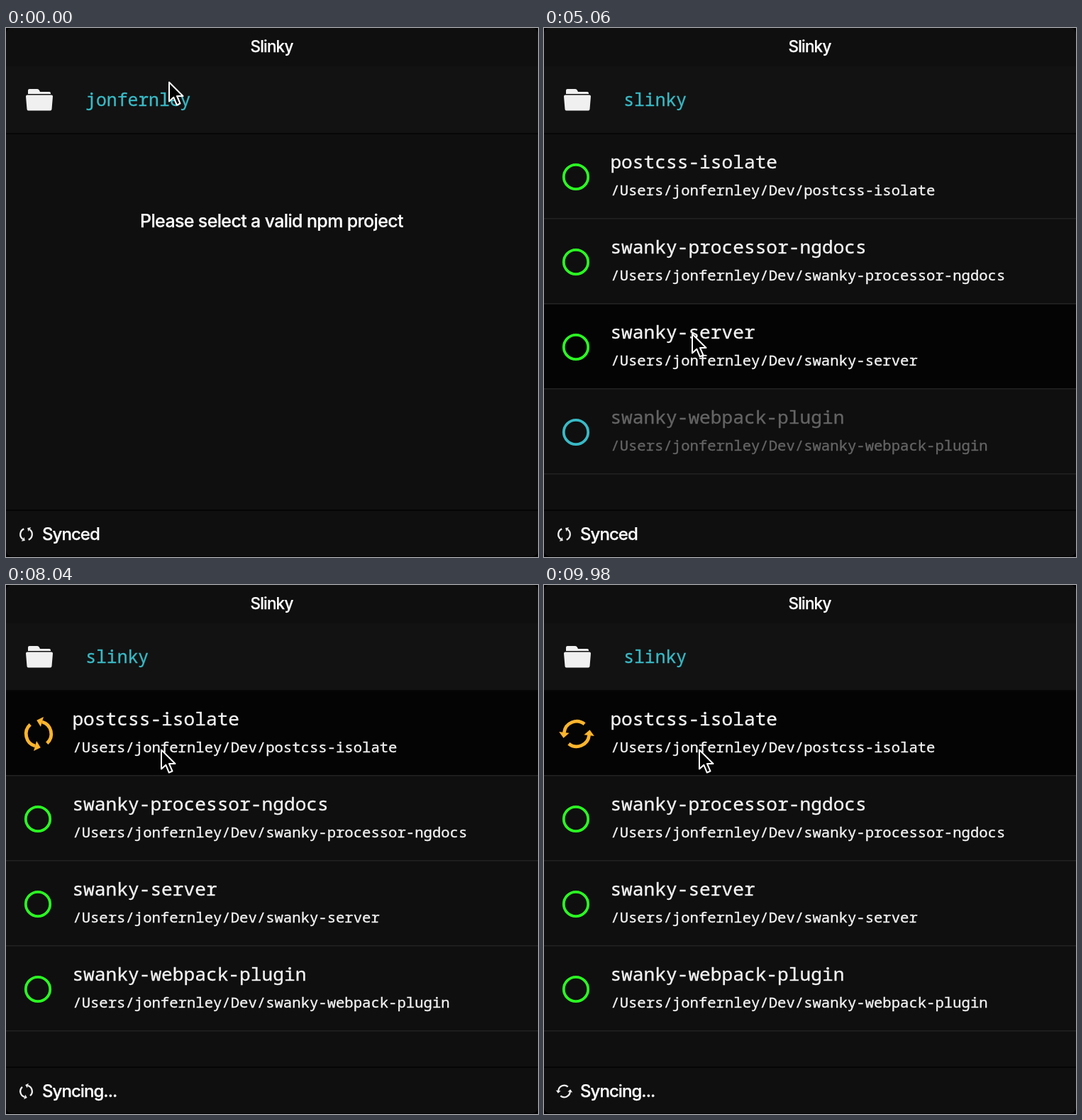
Animation of 750x746 px, one loop 10000 ms. Source, as an HTML page:

```html
<!DOCTYPE html>
<html lang="en">
<head>
<meta charset="utf-8">
<title>Slinky</title>
<style>
html, body { margin: 0; width: 100%; height: 100%; overflow: hidden; background: #000; }
svg { display: block; width: 750px; height: 746px; }
text { white-space: pre; }
.ui { font-family: Inter, "Open Sans", sans-serif; font-weight: 500; fill: #fff; stroke: #fff; stroke-width: .25px; }
.mono { font-family: "Noto Sans Mono", "DejaVu Sans Mono", monospace; font-weight: 500;
  fill: currentColor; stroke: currentColor; stroke-width: .35px; }
.label { font-size: 24.7px; color: #38bac6; }
.name { font-size: 26.2px; }
.path { font-size: 20.6px; }
</style>
</head>
<body>
<svg viewBox="0 0 750 746" xmlns="http://www.w3.org/2000/svg">
  <defs>
    <g id="half">
      <path d="M0-17.700A17.700 17.700 0 0 1 15 9.400" fill="none" stroke="currentColor" stroke-width="4.800"/>
      <path d="M0-25V-10.500L-8-17.700z" fill="currentColor"/>
    </g>
    <g id="sync">
      <use href="#half"/>
      <use href="#half" transform="rotate(180)"/>
    </g>
  </defs>
  <rect width="750" height="745" rx="8" fill="#0f0f0f"/>
  <rect y="54" width="750" height="94" fill="#121212"/>
  <rect y="148" width="750" height="2" fill="#070707"/>
  <text class="ui" x="374.500" y="34" text-anchor="middle" font-size="22.5" letter-spacing="-.8">Slinky</text>
  <g fill="#f0f0f0">
    <path d="M31 93V88q0-2 2-2h11q2 0 3 2l1 2h13q2 0 2 2v1z"/>
    <path d="M30 94.500H64q2 0 2 2l-1.500 18q-.2 2-2 2H31.500q-2 0-2-2L28 96.500q0-2 2-2z"/>
  </g>
  <text id="label" class="mono label" x="112.200" y="110"></text>
  <text id="hint" class="ui" x="374.500" y="281" text-anchor="middle" font-size="25" letter-spacing="-.64">Please select a valid npm project</text>
  <g id="list"></g>
  <rect y="679" width="750" height="2" fill="#050505"/>
  <g id="footIcon" color="#f0f0f0"><use href="#sync"/></g>
  <text id="status" class="ui" x="51" y="722" font-size="24" letter-spacing="-.95"></text>
  <path id="cursor" d="M0 1.500V28.500L6.300 22.700L10.800 33.500L15.500 31.500L11 21H19.500z"
    fill="#000" stroke="#fff" stroke-width="2" stroke-linejoin="round"/>
</svg>
<script>
const LOOP = 10000, OPEN = 2600, BASE = 35, SPIN = 144, HOVER_LAG = 100;
const USER = 'jonfernley';
const TOP = 149, STEP = 120;
const TEAL = '#38bac6', GREEN = '#2bf922', DIM = '#646464', LIT = '#f4f4f4';

const packages = ['postcss-isolate', 'swanky-processor-ngdocs', 'swanky-server', 'swanky-webpack-plugin'];

// Each job: row, start, end, linked state afterwards
const jobs = [
  [0, 3450, 3900, true],
  [1, 4020, 4450, true],
  [2, 4600, 5020, true],
  [3, 5400, 5880, true],
  [0, 6660, LOOP, false]
];

// Cursor stops: time, x, y
const stops = [
  [0, 230, 75], [700, 186, 108], [1050, 186, 108], [1250, 104, 128], [1700, -40, 400],
  [2700, -40, 400], [3250, 196, 206], [3540, 197, 212], [3720, 202, 326], [4080, 203, 334],
  [4480, 209, 430], [5080, 209, 430], [5350, 214, 548], [5850, 214, 548], [6400, 219, 231]
];

const $ = id => document.getElementById(id);

function el(tag, attrs, parent, text) {
  const node = document.createElementNS('http://www.w3.org/2000/svg', tag);
  for (const key in attrs) node.setAttribute(key, attrs[key]);
  if (text) node.textContent = text;
  parent.appendChild(node);
  return node;
}

const rows = packages.map((name, i) => {
  const g = el('g', { transform: `translate(0 ${TOP + i * STEP})` }, $('list'));
  const back = el('rect', { y: 1, width: 750, height: 118, fill: '#040404' }, g);
  el('rect', { y: 119, width: 750, height: 1.5, fill: '#222' }, g);
  const ring = el('circle', { cx: 45, cy: 61, r: 17.2, fill: 'none', 'stroke-width': 3.8 }, g);
  const icon = el('g', { color: '#fcb52d' }, g);
  el('use', { href: '#sync' }, icon);
  const words = el('g', {}, g);
  el('text', { class: 'mono name', x: 93.4, y: 49 }, words, name);
  el('text', { class: 'mono path', x: 94.3, y: 87 }, words, `/Users/${USER}/Dev/${name}`);
  return { back, ring, icon, words };
});

const show = (node, on) => node.setAttribute('display', on ? 'inline' : 'none');

function cursorAt(t) {
  const i = stops.findIndex(s => s[0] > t);
  if (i < 0) return stops[stops.length - 1].slice(1);
  if (i === 0) return stops[0].slice(1);
  const [t0, x0, y0] = stops[i - 1], [t1, x1, y1] = stops[i];
  const u = (t - t0) / (t1 - t0), e = u * u * (3 - 2 * u);
  return [x0 + (x1 - x0) * e, y0 + (y1 - y0) * e];
}

function draw(t) {
  const open = t >= OPEN;
  const job = jobs.find(j => t >= j[1] && t < j[2]);
  const angle = job ? BASE - SPIN * (t - job[1]) / 1000 : BASE;
  const [x, y] = cursorAt(t);
  const [hx, hy] = cursorAt(t - HOVER_LAG);
  const hover = hx >= 0 ? Math.floor((hy - TOP) / STEP) : -1;

  $('label').textContent = open ? 'slinky' : USER;
  $('status').textContent = job ? 'Syncing...' : 'Synced';
  show($('hint'), !open);
  show($('list'), open);
  $('footIcon').setAttribute('transform', `translate(28.5 714) rotate(${angle}) scale(.47)`);
  $('cursor').setAttribute('transform', `translate(${x} ${y})`);

  rows.forEach((row, i) => {
    const busy = job && job[0] === i;
    const linked = jobs.reduce((state, j) => j[0] === i && t >= j[2] ? j[3] : state, false);
    show(row.back, hover === i);
    show(row.ring, !busy);
    show(row.icon, busy);
    row.ring.setAttribute('stroke', linked ? GREEN : TEAL);
    row.icon.setAttribute('transform', `translate(46 61) rotate(${angle})`);
    row.words.setAttribute('color', linked ? LIT : DIM);
  });
}

const start = performance.now();
function tick() {
  draw((performance.now() - start) % LOOP);
  requestAnimationFrame(tick);
}
tick();
</script>
</body>
</html>
```
